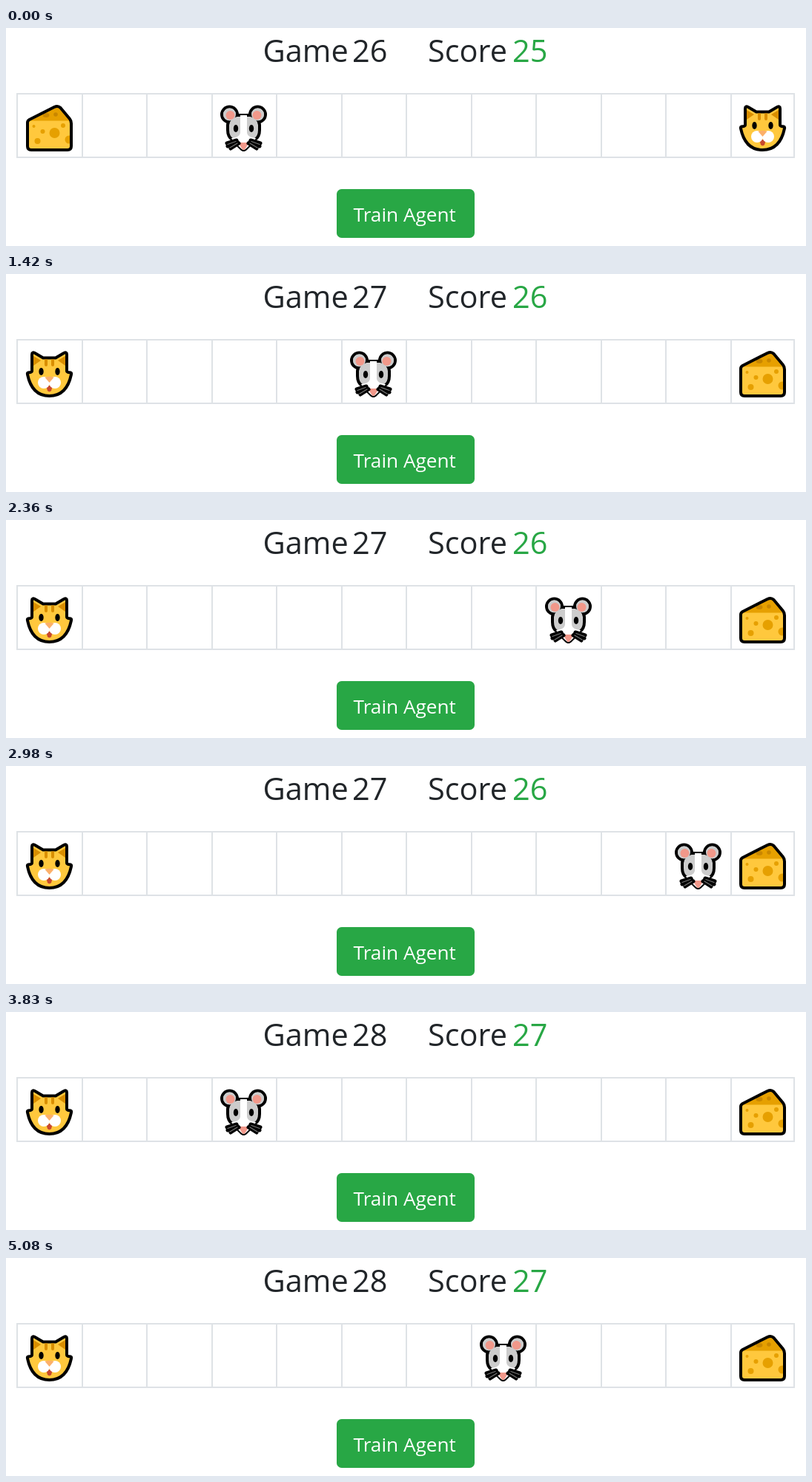
Recreate the animation shown at these times as an HTML page. Size 1079 px wide and 295 px high, loop 5160 ms.

```html
<!DOCTYPE html>
<html lang="en">
<head>
<meta charset="utf-8">
<title>Cheese game</title>
<style>
  html, body { margin: 0; width: 100%; height: 100%; overflow: hidden; background: #fff; }
  svg { display: block; width: 1079px; height: 295px; }
  text { font-family: "Open Sans", "Noto Sans", sans-serif; }
  .head { font-size: 41.5px; fill: #212529; }
  #score { fill: #28a745; transform-box: fill-box; transform-origin: center; }
  .label { font-size: 26.2px; fill: #fff; }
  .line { fill: #dee2e6; }
  .ink { stroke: #000; stroke-width: 4; stroke-linejoin: round; }
</style>
</head>
<body>
<svg viewBox="0 0 1079 295">
  <defs>
    <clipPath id="cheeseBody">
      <path id="cheeseShape" d="M2 24Q2 21.5 4.500 20L38 3Q43 .5 46.500 4L59 19Q61 21.500 61 25V56Q61 61 56 61H7Q2 61 2 56Z"/>
    </clipPath>
    <clipPath id="mouseFace">
      <path id="mouseShape" d="M22 14H41Q52 17 53 27V34Q53 43 47 47L34 60Q31.500 62 29 60L16 47Q10 43 10 34V27Q11 17 22 14Z"/>
    </clipPath>
  </defs>

  <g class="head">
    <text x="346.500" y="46">Game</text>
    <text id="game" x="467" y="46">26</text>
    <text x="569" y="46">Score</text>
    <text id="score" x="683" y="46">25</text>
  </g>

  <g id="grid" class="line">
    <rect x="14" y="88" width="1050" height="2"/>
    <rect x="14" y="174" width="1050" height="2"/>
  </g>

  <rect x="446" y="218" width="186" height="66" rx="6.600" fill="#28a745"/>
  <text class="label" x="468.500" y="262">Train Agent</text>

  <g id="cheese">
    <g clip-path="url(#cheeseBody)">
      <rect width="63" height="63" fill="#ffc83d"/>
      <rect width="63" height="21.500" fill="#e6a000"/>
      <g fill="#c98700">
        <circle cx="40" cy="13" r="2.800"/>
        <ellipse cx="27" cy="14" rx="4.500" ry="3"/>
      </g>
      <g fill="#e6a000">
        <circle cx="38.500" cy="38" r="7"/>
        <circle cx="15.500" cy="49" r="4"/>
        <circle cx="22.500" cy="36" r="3"/>
        <circle cx="10.500" cy="29" r="2"/>
        <circle cx="50" cy="28" r="3"/>
        <circle cx="58" cy="47" r="5.500"/>
      </g>
    </g>
    <use href="#cheeseShape" class="ink" fill="none"/>
  </g>

  <g id="cat">
    <path class="ink" fill="#ffc83d" d="M8 5Q8 1 12 3L23 9.500H40L51 3Q55 1 55 5V27Q55 28.500 57 29L60 29.500Q61.500 30 61 32Q55 61 31.500 61Q8 61 2 32Q1.500 30 3 29.500L6 29Q8 28.500 8 27Z"/>
    <path fill="#d98e00" d="M10 7L20 13L10 20ZM53 7L43 13L53 20Z"/>
    <path fill="#d98e00" d="M25 11.500H29V19Q29 21 27 21T25 19ZM34 11.500H38V19Q38 21 36 21T34 19Z"/>
    <ellipse cx="20.500" cy="28" rx="3.200" ry="5"/>
    <ellipse cx="42.500" cy="28" rx="3.200" ry="5"/>
    <path fill="#c8492f" d="M27 47H36L34 54Q31.500 56.500 29 54Z"/>
    <circle cx="24" cy="43" r="8" fill="#fff"/>
    <circle cx="39" cy="43" r="8" fill="#fff"/>
    <path fill="#fcb06a" d="M25.500 36Q31.500 33.500 37.500 36L31.500 43Z"/>
  </g>

  <g id="mouse">
    <g class="ink" fill="#ccc">
      <circle cx="12.500" cy="13" r="10.500"/>
      <circle cx="50.500" cy="13" r="10.500"/>
    </g>
    <use href="#mouseShape" class="ink" fill="#ccc"/>
    <g clip-path="url(#mouseFace)">
      <path fill="#fff" d="M27 14H36V38Q37 44 48 45L40 62H23L15 45Q26 44 27 38Z"/>
      <path fill="#f1988a" d="M24 51H39L31.500 63Z"/>
    </g>
    <g fill="#ccc">
      <circle cx="12.500" cy="13" r="8.500"/>
      <circle cx="50.500" cy="13" r="8.500"/>
    </g>
    <g fill="#f1988a">
      <circle cx="13.500" cy="14" r="6"/>
      <circle cx="49.500" cy="14" r="6"/>
    </g>
    <ellipse cx="21" cy="32" rx="3.200" ry="5"/>
    <ellipse cx="42" cy="32" rx="3.200" ry="5"/>
    <g id="whiskers" fill="none" stroke-linecap="round">
      <path stroke="#000" stroke-width="5" d="M22 48L9 52M23 50L10 56M25 52L14 59"/>
      <path stroke="#767676" stroke-width="1.300" d="M21 49.500L10 53.500M23 52L13 58"/>
    </g>
    <use href="#whiskers" transform="matrix(-1 0 0 1 63 0)"/>
  </g>
</svg>
<script>
  const LOOP = 5160;
  const STEP = 80;
  const START_CELL = 3;
  const LAST_CELL = 11;

  // Each game: start time, cheese side, pulse steps, then [time, cell] moves.
  const games = [
    { number: 26, at: 0, cheeseLeft: true, pulse: 0, moves: [[190, 2], [500, 1]] },
    { number: 27, at: 800, cheeseLeft: false, pulse: 4,
      moves: [[1110, 4], [1420, 5], [1740, 6], [2040, 7], [2360, 8], [2670, 9], [2980, 10]] },
    { number: 28, at: 3210, cheeseLeft: false, pulse: 5,
      moves: [[3520, 2], [3830, 3], [4140, 4], [4460, 5], [4780, 6], [5080, 7]] }
  ];

  const byId = id => document.getElementById(id);
  const [grid, game, score, cheese, cat, mouse] =
    ["grid", "game", "score", "cheese", "cat", "mouse"].map(byId);

  for (let i = 0; i <= 12; i++) {
    const line = document.createElementNS(grid.namespaceURI, "rect");
    const box = { x: Math.min(1062, Math.ceil(14 + 87.5 * i)), y: 88, width: 2, height: 88 };
    for (const key in box) line.setAttribute(key, box[key]);
    grid.append(line);
  }

  function place(icon, cell) {
    icon.setAttribute("transform", `translate(${Math.floor(27 + 87.5 * cell)} 104)`);
  }

  function draw(t) {
    const round = games.findLast(g => t >= g.at);
    const move = round.moves.findLast(([time]) => t >= time);
    place(mouse, move ? move[1] : START_CELL);
    place(cheese, round.cheeseLeft ? 0 : LAST_CELL);
    place(cat, round.cheeseLeft ? LAST_CELL : 0);

    const step = Math.floor((t - round.at) / STEP);
    const late = round.pulse && step < 1;
    const scale = step < round.pulse ? 1 + 0.05 * Math.sin(Math.PI * (step + 0.7) / round.pulse) : 1;
    game.textContent = round.number;
    score.textContent = round.number - (late ? 2 : 1);
    score.style.transform = `scale(${scale})`;
  }

  function tick() {
    draw(performance.now() % LOOP);
    requestAnimationFrame(tick);
  }
  tick();
</script>
</body>
</html>
```
